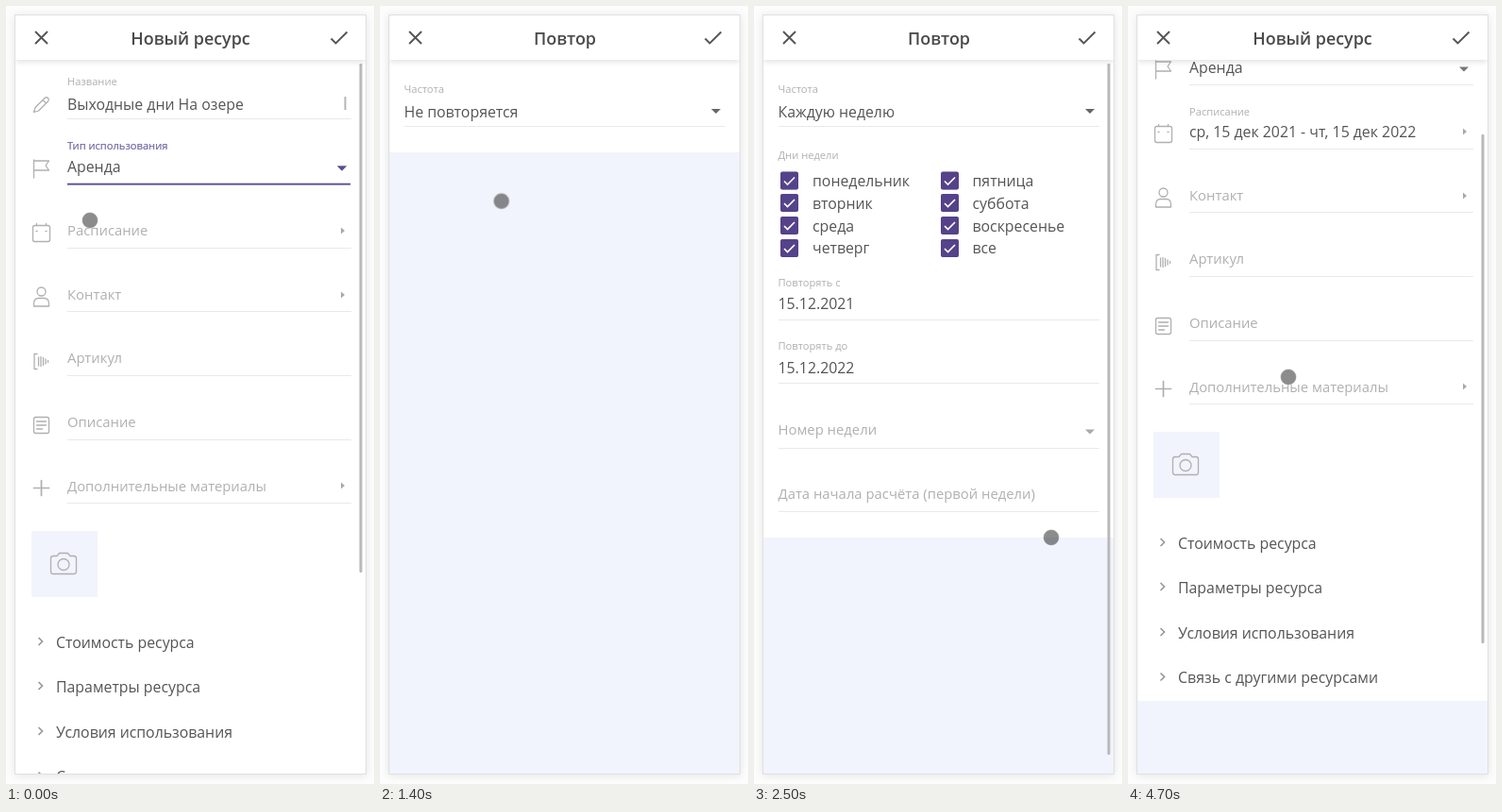
Write an HTML page that moves like this. It is 390x824 px and loops after 4.8 s.

```html
<!DOCTYPE html>
<html lang="ru">
<head>
<meta charset="utf-8">
<title>Расписание ресурса</title>
<style>
html, body { margin: 0; width: 100%; height: 100%; overflow: hidden; background: #fdfdfd; }
svg { display: block; width: 390px; height: 824px; font-family: "Open Sans", "Noto Sans", sans-serif; }

text { fill: #555; font-size: 15.85px; }
.title { font-size: 17.9px; font-weight: 600; fill: #4a4a4a; text-anchor: middle; }
.hint { font-size: 14.85px; fill: #b0b0b0; }
.label { font-size: 11.15px; fill: #b0b0b0; }
.zone { font-size: 11.9px; fill: #adadad; text-anchor: end; }
.mid text { text-anchor: middle; font-size: 13.85px; }
.spans text { fill: #adadad; }
.time { font-size: 16.5px; }
.link { font-size: 13.4px; fill: #5f5088; }
.dialog text { font-family: Roboto, sans-serif; font-size: 15px; letter-spacing: .52px; fill: #4c4c4c; }
.dialog .head { font-size: 19.6px; letter-spacing: 0; fill: #3c3c3c; }
.dialog .button { font-size: 13px; letter-spacing: .5px; fill: #63539a; }
.under { text-decoration: underline; }

.line { stroke: #e9e9e9; fill: none; }
.icon { stroke: #b0b0b0; stroke-width: 1.3; fill: none; stroke-linecap: round; stroke-linejoin: round; }
.dark { stroke: #555; stroke-width: 1.9; fill: none; }
.bar { fill: #b9b9b9; }
.tint { fill: #f1f4fc; }
.white { fill: #fff; }
.shade { fill: #fff; filter: drop-shadow(0 2px 3px rgba(0, 0, 0, .12)); }
.card { filter: drop-shadow(0 1px 5px rgba(0, 0, 0, .1)); }
.sheet { fill: #fff; filter: drop-shadow(0 9px 8px rgba(0, 0, 0, .25)) drop-shadow(0 12px 18px rgba(0, 0, 0, .25)); }

/* One loop is 4.8 s; one picture step of 100 ms is about 2.083 %. */
.home, .plan, .repeat, .dialog, .focus, .early, .late, .hours, .allday,
.never, .weekly, .first, .last, .fill, .sat, .fri, .scroll, .thumb, .cursor {
  animation: 4.8s step-end infinite;
}
.home { animation-name: home; }
.plan { animation-name: plan; }
.repeat { animation-name: repeat; }
.dialog { animation-name: dialog; }
.focus, .early { animation-name: early; }
.late { animation-name: late; }
.hours { animation-name: hours; }
.allday { animation-name: allday; }
.never { animation-name: never; }
.weekly { animation-name: weekly; }
.first { animation-name: first; }
.last { animation-name: last; }
.fill { animation-name: clear; }
.sat { animation-name: sat; }
.fri { animation-name: fri; }
.scroll { animation-name: scroll; }
.thumb { animation-name: thumb; }
.cursor { animation-name: cursor; fill: rgba(0, 0, 0, .45); stroke: rgba(255, 255, 255, .5); }

@keyframes home { 0% { opacity: 1 } 6.25% { opacity: 0 } 91.66% { opacity: 1 } }
@keyframes plan { 0% { opacity: 0 } 6.25% { opacity: 1 } 27.08% { opacity: 0 } 79.16% { opacity: 1 } 91.66% { opacity: 0 } }
@keyframes repeat { 0% { opacity: 0 } 27.08% { opacity: 1 } 79.16% { opacity: 0 } }
@keyframes dialog { 0% { opacity: 0 } 33.33% { opacity: .5 } 35.41% { opacity: 1 } 52.08% { opacity: 0 } }
@keyframes early { 0% { opacity: 1 } 50%, 100% { opacity: 0 } }
@keyframes late { 0% { opacity: 0 } 50%, 100% { opacity: 1 } }
@keyframes hours { 0% { opacity: 1 } 22.91%, 100% { opacity: 0 } }
@keyframes allday { 0% { opacity: 0 } 22.91%, 100% { opacity: 1 } }
@keyframes never { 0% { opacity: 1 } 52.08%, 100% { opacity: 0 } }
@keyframes weekly { 0% { opacity: 0 } 52.08%, 100% { opacity: 1 } }
@keyframes first { 0% { opacity: 1 } 43.75%, 100% { opacity: 0 } }
@keyframes last { 0% { opacity: 0 } 43.75%, 100% { opacity: 1 } }
@keyframes clear { 0% { opacity: 1 } 60.41% { opacity: .4 } 62.5%, 100% { opacity: 0 } }
@keyframes sat { 0% { opacity: 1 } 60.41% { opacity: .4 } 62.5% { opacity: 0 } 68.75% { opacity: .4 } 70.83%, 100% { opacity: 1 } }
@keyframes fri { 0% { opacity: 1 } 60.41% { opacity: .4 } 62.5% { opacity: 0 } 72.91% { opacity: .35 } 75%, 100% { opacity: 1 } }
@keyframes scroll {
  0% { transform: translateY(0) }
  93.75% { transform: translateY(0); animation-timing-function: steps(2) }
  97.91%, 100% { transform: translateY(-105px) }
}
@keyframes thumb {
  0% { transform: translateY(0) }
  93.75% { transform: translateY(0); animation-timing-function: steps(2) }
  97.91%, 100% { transform: translateY(75px) }
}
@keyframes cursor {
  0% { transform: translate(89px, 227px); animation-timing-function: steps(2) }
  4.16% { transform: translate(95px, 238px) }
  6.25% { transform: translate(95px, 238px); animation-timing-function: steps(4) }
  14.58% { transform: translate(316px, 199px) }
  16.66% { transform: translate(325px, 197px); animation-timing-function: steps(2) }
  20.83% { transform: translate(328px, 322px) }
  22.91% { transform: translate(328px, 322px) }
  25% { transform: translate(170px, 386px); animation-timing-function: steps(3) }
  31.25% { transform: translate(108px, 117px) }
  35.41% { transform: translate(109px, 117px) }
  37.5% { transform: translate(80px, 330px); animation-timing-function: steps(2) }
  41.66% { transform: translate(55px, 508px) }
  43.75% { transform: translate(55px, 508px); animation-timing-function: steps(2) }
  47.91% { transform: translate(315px, 560px); animation-timing-function: steps(2) }
  52.08% { transform: translate(315px, 563px); animation-timing-function: steps(3) }
  58.33% { transform: translate(207px, 257px) }
  64.58% { transform: translate(207px, 257px); animation-timing-function: steps(2) }
  68.75% { transform: translate(207px, 209px) }
  70.83% { transform: translate(207px, 209px) }
  72.91% { transform: translate(212px, 179px); animation-timing-function: steps(2) }
  77.08% { transform: translate(352px, 35px) }
  79.16% { transform: translate(352px, 35px); animation-timing-function: steps(3) }
  85.41% { transform: translate(179px, 501px); animation-timing-function: steps(2) }
  89.58% { transform: translate(352px, 35px) }
  91.66% { transform: translate(352px, 35px) }
  93.75% { transform: translate(178px, 498px); animation-timing-function: steps(2) }
  97.91%, 100% { transform: translate(170px, 393px) }
}
</style>
</head>
<body>
<svg viewBox="0 0 390 824">
  <defs>
    <clipPath id="stage"><rect x="10" y="10" width="371" height="803"/></clipPath>
    <path id="cross" class="dark" d="M31 27l13 13M44 27l-13 13"/>
    <path id="back" class="dark" d="M41.5 26.5l-7.5 7 7.5 7"/>
    <path id="done" class="dark" d="M344.5 34.5l5 5 12-12"/>
    <path id="drop" d="M-5 -2.5h10l-5 5z"/>
    <path id="next" d="M-2 -3.5l4 3.5-4 3.5z" fill="#aaa"/>
    <path id="fold" d="M-2 -4l4 4-4 4" fill="none" stroke="#999" stroke-width="1.7"/>
    <g id="clock" class="dark" style="stroke: #444; stroke-width: 1.6">
      <circle r="9"/><path d="M0 -5.5v6h5"/>
    </g>
    <rect id="box" x="-8.7" y="-8.7" width="17.4" height="17.4" rx="2" fill="#fff" stroke="#c4c4c4" stroke-width="1.5"/>
    <g id="tick">
      <rect x="-9.5" y="-9.5" width="19" height="19" rx="2" fill="#55428a"/>
      <path d="M-5.5 .5l3.5 3.5 7.5-7.5" fill="none" stroke="#fff" stroke-width="1.7"/>
    </g>
    <circle id="ring" r="9" fill="none" stroke="#757575" stroke-width="1.9"/>
    <g id="dot" fill="#5b4794">
      <circle r="9" fill="#fff" stroke="#5b4794" stroke-width="2"/><circle r="5.6"/>
    </g>
  </defs>

  <rect class="card white" x="9.5" y="9.5" width="372" height="804" stroke="#e0e0e0"/>

  <g clip-path="url(#stage)">
    <!-- New resource -->
    <g class="home">
      <rect class="white" x="10" y="10" width="371" height="804"/>
      <g class="scroll">
        <rect class="tint" x="10" y="841" width="371" height="120"/>
        <path class="line" d="M65 119.5h301M65 188.5h301M65 256.5h301M65 323.5h301M65 391.5h301M65 459.5h301M65 526.5h301"/>
        <text class="label" x="65" y="84">Название</text>
        <text x="65" y="109.5">Выходные дни На озере</text>
        <rect x="358.5" y="96" width="2" height="14" fill="#b5b5b5"/>
        <text class="label" x="65" y="152">Тип использования</text>
        <text x="65" y="176.4">Аренда</text>
        <use href="#drop" x="356" y="172" fill="#777"/>
        <g class="focus" fill="#5c4d96">
          <text class="label" x="65" y="152" style="fill: #7668ad">Тип использования</text>
          <use href="#drop" x="356" y="172"/>
          <rect x="65" y="187.7" width="300" height="1.9"/>
        </g>
        <text class="hint early" x="65" y="243">Расписание</text>
        <g class="late">
          <text class="label" x="65" y="220.5">Расписание</text>
          <text x="65" y="244">ср, 15 дек 2021 - чт, 15 дек 2022</text>
        </g>
        <text class="hint" x="65" y="311">Контакт</text>
        <text class="hint" x="65" y="378">Артикул</text>
        <text class="hint" x="65" y="446">Описание</text>
        <text class="hint" x="65" y="514">Дополнительные материалы</text>
        <use href="#next" x="357" y="238"/>
        <use href="#next" x="357" y="306"/>
        <use href="#next" x="357" y="508"/>

        <g class="icon">
          <path d="M29.5 112.5l1.5-5 10-10q2-1.5 3.5 0t0 3.5l-10 10zM39 99.5l3.5 3.5"/>
          <path d="M29.5 163v19M29.5 164h16l-3.5 5 3.5 5h-16"/>
          <rect x="28.5" y="232.5" width="18" height="17" rx="2"/>
          <path d="M32.5 230.5v2M42.5 230.5v2M32 238.5h1M42 238.5h1"/>
          <circle cx="37.5" cy="302.5" r="4.5"/>
          <path d="M29.5 318v-2.5q0-6 5-6h6q5 0 5 6v2.5z"/>
          <path d="M33 368.5h-3v16h3M34.5 372v9M37 371.5v10M39.5 372.5v8M42 374v5M44.5 375.5v2"/>
          <rect x="29.5" y="435.5" width="16" height="17" rx="2"/>
          <path d="M32.5 440h10M32.5 444h10M32.5 448h6"/>
          <path d="M29.5 510.5h16M37.5 502.5v16" stroke-width="1.7"/>
        </g>

        <rect class="tint" x="27" y="556" width="70" height="70"/>
        <g class="icon">
          <path d="M50 582.5h4l2.5-3h9l2.5 3h4q2.5 0 2.5 2.5v14q0 2.5-2.5 2.5h-22q-2.5 0-2.5-2.5v-14q0-2.5 2.5-2.5z"/>
          <circle cx="61" cy="591.5" r="6"/>
        </g>

        <use href="#fold" x="36.5" y="673"/>
        <use href="#fold" x="36.5" y="720"/>
        <use href="#fold" x="36.5" y="768"/>
        <use href="#fold" x="36.5" y="815.5"/>
        <text x="53" y="679.5">Стоимость ресурса</text>
        <text x="53" y="727">Параметры ресурса</text>
        <text x="53" y="774.5">Условия использования</text>
        <text x="53" y="822">Связь с другими ресурсами</text>
      </g>
      <rect class="bar thumb" x="374.5" y="61" width="3" height="539" rx="1"/>
      <rect class="shade" x="10" y="10" width="371" height="47"/>
      <use href="#cross"/><use href="#done"/>
      <text class="title" x="195.5" y="41">Новый ресурс</text>
    </g>

    <!-- Schedule -->
    <g class="plan">
      <rect class="tint" x="10" y="10" width="371" height="804"/>
      <rect class="white" x="10" y="120" width="371" height="431"/>
      <path class="line" d="M26 183.5h226M281 183.5h56M26 268.5h226M281 268.5h56M26 403.5h340M26 487.5h340"/>

      <text class="label" x="25.5" y="147">Начало</text>
      <text x="25.5" y="172.5">ср, 15 дек 2021</text>
      <text class="label" x="25.5" y="232">Окончание</text>
      <text x="25.5" y="257">ср, 15 дек 2021</text>
      <use href="#drop" x="243.5" y="167" fill="#777"/>
      <use href="#drop" x="243.5" y="251" fill="#777"/>
      <use href="#clock" x="353.5" y="169"/>
      <use href="#clock" x="353.5" y="253.5"/>
      <text class="zone" x="366" y="200.5">Europe/Moscow (GMT+3)</text>
      <text class="zone" x="366" y="285.5">Europe/Moscow (GMT+3)</text>

      <g class="mid spans">
        <text x="57" y="328.5">15м</text>
        <text x="120.5" y="328.5">45м</text>
        <text x="247" y="328.5">2ч</text>
      </g>
      <g class="hours">
        <text class="time" x="283.5" y="175.5">14:00</text>
        <text class="time" x="283.5" y="260">15:00</text>
        <g class="mid spans">
          <text class="under" x="184" y="328.5">1ч</text>
          <text x="328.5" y="328.5">Весь день</text>
        </g>
      </g>
      <g class="allday">
        <text class="time" x="283.5" y="175.5">00:00</text>
        <text class="time" x="283.5" y="260">23:59</text>
        <g class="mid spans">
          <text x="184" y="328.5">1ч</text>
          <text class="under" x="328.5" y="328.5">Весь день</text>
        </g>
      </g>

      <text class="label" x="25.5" y="367.5">Повтор</text>
      <text class="never" x="25.5" y="392">Не повторяется</text>
      <text class="weekly" x="25.5" y="392">Каждую неделю</text>
      <use href="#next" x="357" y="385"/>
      <text class="hint" x="25.5" y="473">Описание</text>
      <path class="icon" d="M328 522.5h14M332.5 522v-2h5v2M329.5 523v13.5h11v-13.5"/>
      <text class="link" x="25.5" y="589">Добавить промежуток времени</text>

      <rect class="bar" x="374.5" y="108" width="3" height="650" rx="1"/>
      <rect class="shade" x="10" y="10" width="371" height="95"/>
      <use href="#back"/><use href="#done"/>
      <text class="title" x="196" y="41">Расписание</text>
      <g class="mid">
        <text x="79" y="86.5">Расписание (1)</text>
        <text x="208.5" y="86.5">Исключение</text>
        <text x="325.5" y="86.5">Перенос</text>
      </g>
      <rect x="10" y="102.5" width="137" height="2.2" fill="#5c4d96"/>
    </g>

    <!-- Repeat -->
    <g class="repeat">
      <rect class="tint" x="10" y="10" width="371" height="804"/>
      <rect class="white" x="10" y="57" width="371" height="98"/>
      <g class="weekly">
        <rect class="white" x="10" y="150" width="371" height="413"/>
        <path class="line" d="M26 332.5h340M26 399.5h340M26 468.5h340M26 535.5h340"/>
        <text class="label" x="25.5" y="162">Дни недели</text>

        <use href="#box" x="37.5" y="185"/>
        <use href="#box" x="37.5" y="208.5"/>
        <use href="#box" x="37.5" y="232.5"/>
        <use href="#box" x="37.5" y="256.5"/>
        <use href="#box" x="207.5" y="185"/>
        <use href="#box" x="207.5" y="208.5"/>
        <use href="#box" x="207.5" y="232.5"/>
        <use href="#box" x="207.5" y="256.5"/>
        <g class="fill">
          <use href="#tick" x="37.5" y="185"/>
          <use href="#tick" x="37.5" y="208.5"/>
          <use href="#tick" x="37.5" y="232.5"/>
          <use href="#tick" x="37.5" y="256.5"/>
          <use href="#tick" x="207.5" y="232.5"/>
          <use href="#tick" x="207.5" y="256.5"/>
        </g>
        <g class="fri"><use href="#tick" x="207.5" y="185"/></g>
        <g class="sat"><use href="#tick" x="207.5" y="208.5"/></g>

        <text x="62" y="191">понедельник</text>
        <text x="62" y="215">вторник</text>
        <text x="62" y="238.5">среда</text>
        <text x="62" y="262">четверг</text>
        <text x="231.5" y="191">пятница</text>
        <text x="231.5" y="215">суббота</text>
        <text x="231.5" y="238.5">воскресенье</text>
        <text x="231.5" y="262">все</text>

        <text class="label" x="25.5" y="296.5">Повторять с</text>
        <text x="25.5" y="321">15.12.2021</text>
        <text class="label" x="25.5" y="364">Повторять до</text>
        <text x="25.5" y="388.5">15.12.2022</text>
        <text class="hint" x="25.5" y="454">Номер недели</text>
        <use href="#drop" x="356" y="451" fill="#aaa"/>
        <text class="hint" x="25.5" y="522">Дата начала расчёта (первой недели)</text>
        <rect class="bar" x="374.5" y="61" width="3" height="732" rx="1"/>
      </g>

      <path class="line" d="M26 127.5h340"/>
      <text class="label" x="25.5" y="92">Частота</text>
      <text class="never" x="25.5" y="118">Не повторяется</text>
      <text class="weekly" x="25.5" y="118">Каждую неделю</text>
      <use href="#drop" x="356" y="111.5" fill="#666"/>
      <rect class="shade" x="10" y="10" width="371" height="47"/>
      <use href="#cross"/><use href="#done"/>
      <text class="title" x="196" y="41">Повтор</text>

      <g class="dialog">
        <rect x="10" y="10" width="371" height="804" fill="rgba(0, 0, 0, .32)"/>
        <rect class="sheet" x="19.4" y="236" width="353" height="351" rx="4"/>
        <path class="line" d="M19.4 295.5h353M19.4 531.5h353" style="stroke: #dedede"/>
        <text class="head" x="42" y="275.5">Частота</text>
        <use href="#ring" x="54.5" y="319"/>
        <use href="#ring" x="54.5" y="366.5"/>
        <use href="#ring" x="54.5" y="414"/>
        <use href="#ring" x="54.5" y="461"/>
        <use href="#ring" x="54.5" y="508.5"/>
        <g class="first"><use href="#dot" x="54.5" y="319"/></g>
        <g class="last"><use href="#dot" x="54.5" y="508.5"/></g>
        <text x="90" y="324">Не повторяется</text>
        <text x="90" y="371.5">Каждые 15 минут</text>
        <text x="90" y="419">Каждый час</text>
        <text x="90" y="466.5">Каждый день</text>
        <text x="90" y="514">Каждую неделю</text>
        <text class="button" x="283.5" y="564">ВЫБРАТЬ</text>
      </g>
    </g>

    <circle class="cursor" r="8.5"/>
  </g>
</svg>
</body>
</html>
```
